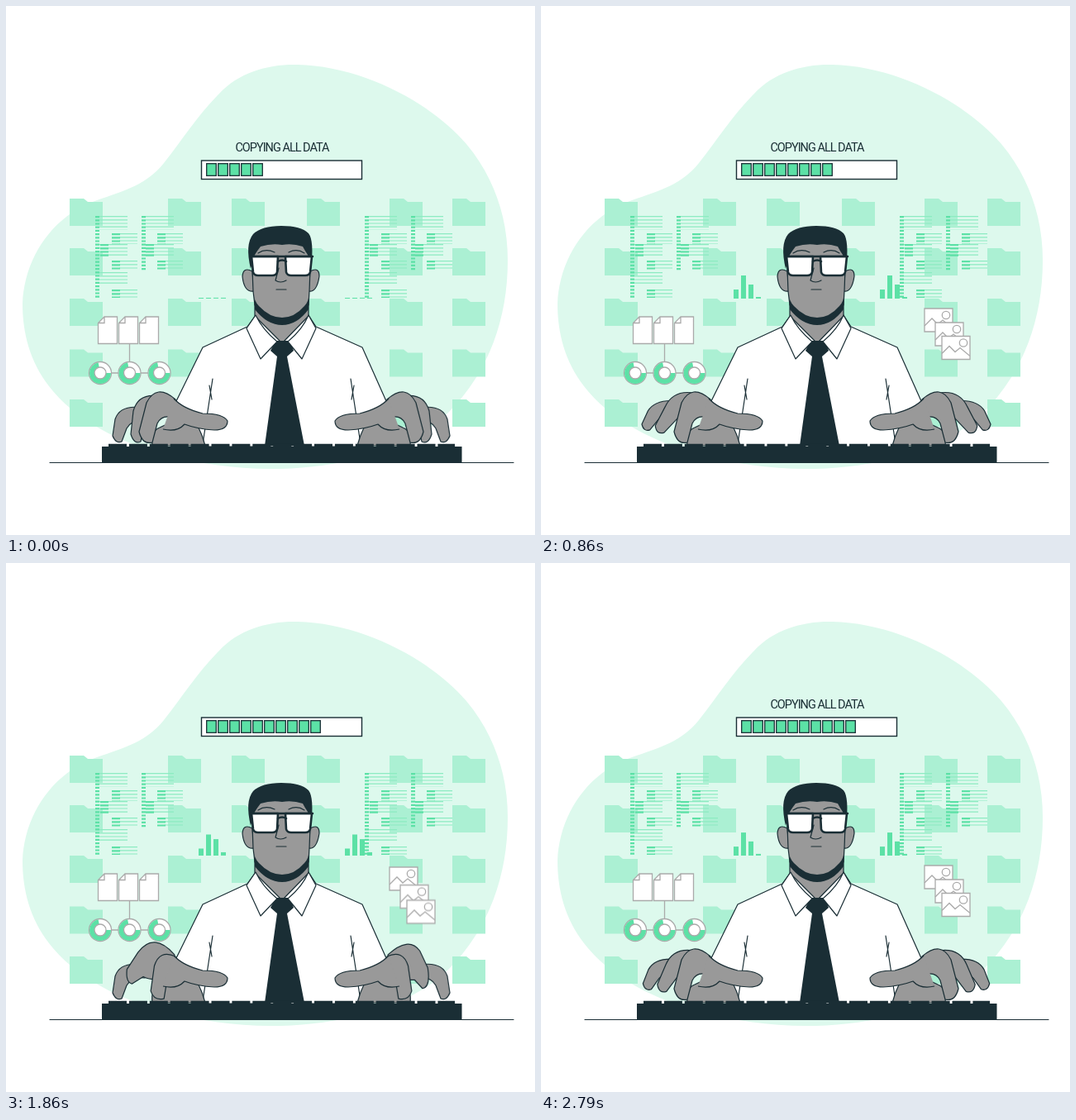
Write an HTML page without scripts that moves like this. It is 640 px wide and 640 px high and loops after 2870 ms.

```html
<!DOCTYPE html>
<html lang="en">
<head>
<meta charset="utf-8">
<title>Copying all data</title>
<style>
html, body { margin: 0; width: 100%; height: 100%; overflow: hidden; background: #fff; }
body > svg { display: block; width: 100%; height: 100%; }

:root { --dark: #1a2e35; --green: #5ce1a6; --skin: #999; --loop: 2.87s infinite; }
.dark { fill: var(--dark); }
.green { fill: var(--green); }
.line { fill: none; stroke: var(--dark); stroke-width: 1.2; stroke-linecap: round; stroke-linejoin: round; }
.skin { fill: var(--skin); stroke: var(--dark); stroke-width: 1.2; stroke-linejoin: round; }
.cloth { fill: #fff; stroke: var(--dark); stroke-width: 1.2; stroke-linejoin: round; }
.icon { fill: #fff; stroke: #aaa; stroke-width: 1.3; }
.rows { fill: none; stroke: #8cebc1; stroke-dasharray: 1.2 3; }
.marks { fill: none; stroke: var(--green); stroke-dasharray: 2.2 2; }

.title {
  font: 14.5px Roboto, "Liberation Sans", sans-serif; letter-spacing: -1px;
  fill: var(--dark); text-anchor: middle; animation: blink var(--loop) step-end;
}
@keyframes blink {
  0%, 22.4%, 44.8%, 67.2%, 89.6%, 100% { opacity: 1; }
  11.2%, 33.6%, 56%, 78.4% { opacity: 0; }
}

.progress { animation: fill-up var(--loop) step-end; }
@keyframes fill-up {
  0% { width: 70px; }
  8.7% { width: 84px; }
  18.1% { width: 98px; }
  27.5% { width: 112px; }
  36.9% { width: 126px; }
  46.3%, 100% { width: 140px; }
}

/* Each bar sets its four heights; the cycle repeats about six times per loop. */
.bar { animation: equalise var(--loop) linear; transform-origin: 0 354px; }
.b1 { --h1: 1.5; --h2: 8; --h3: 11; --h4: 5; }
.b2 { --h1: 3; --h2: 2.5; --h3: 28; --h4: 22; }
.b3 { --h1: 12; --h2: 2.5; --h3: 17; --h4: 24; }
.b4 { --h1: 9; --h2: 4.5; --h3: 2; --h4: 7; }
@keyframes equalise {
  0% { transform: scaleY(1); }
  3%, 19.9%, 36.7%, 53.5%, 70.3%, 87.1% { transform: scaleY(var(--h1)); }
  6.1%, 22.9%, 39.7%, 56.5%, 73.3%, 90.1% { transform: scaleY(var(--h2)); }
  13.2%, 30%, 46.8%, 63.6%, 80.4%, 97.2% { transform: scaleY(var(--h3)); }
  16.2%, 33%, 49.8%, 66.6%, 83.4%, 100% { transform: scaleY(var(--h4)); }
}

.pictures { animation: appear var(--loop) linear; }
@keyframes appear { 0%, 2% { opacity: 0; } 7%, 100% { opacity: 1; } }
.picture { animation: bob var(--loop) linear; }
@keyframes bob {
  0%, 7.6%, 22.4%, 30%, 44.8%, 52.4%, 67.2%, 74.8%, 89.6%, 100% { transform: none; }
  15%, 17.3%, 37.4%, 39.7%, 59.8%, 62.1%, 82.2%, 84.5% { transform: translateY(12px); }
  19.9%, 42.3%, 64.7%, 87.1% { transform: translateY(var(--rise)); }
}

.glare { fill: #bbb; animation: sweep var(--loop) linear; }
@keyframes sweep {
  0%, 37.5%, 42%, 59.9%, 64.4%, 82.3%, 86.8%, 100% { transform: translateX(-34px); }
  41.9%, 64.3%, 86.7% { transform: translateX(34px); }
}

.finger { animation: type var(--loop) linear; d: var(--rest); }
.pinky {
  --rest: path("M165 486Q138 482 132 500L129 520Q133 530 140 527L146 511Q152 500 168 502Z");
  --tap: path("M170 474Q140 470 128 484L118 498Q119 507 127 505L140 494Q150 487 170 492Z");
  --reach: var(--tap);
  --lift: var(--rest);
}
.middle {
  --rest: path("M185 472Q160 468 154 490L151 518Q155 531 163 527L167 508Q170 495 185 500Z");
  --reach: path("M185 466Q160 462 148 482L131 502Q131 512 141 510L160 498Q170 492 185 498Z");
  --tap: var(--reach);
  --lift: path("M205 474Q180 444 160 470L146 490Q144 506 152 508L166 500Q180 508 205 500Z");
}
.index {
  --rest: path("M205 476Q182 456 170 480L161 515Q165 531 177 528L183 505Q190 492 206 500Z");
  --tap: var(--rest);
  --reach: path("M205 474Q186 448 172 472L152 500Q152 516 163 514L180 498Q190 490 206 500Z");
  --lift: path("M205 476Q186 468 180 488L176 518Q180 530 192 527L195 508Q198 498 206 500Z");
}
.right .pinky {
  --reach: path("M168 480Q140 478 128 492L123 512Q127 526 135 523L143 506Q150 496 168 500Z");
}
.right .middle {
  --lift: path("M205 474Q180 450 166 468L156 488Q152 512 162 514L172 504Q184 506 205 500Z");
}
@keyframes type {
  0%, 12.2%, 22.4%, 34.6%, 44.8%, 57%, 67.2%, 79.4%, 89.6%, 100% { d: var(--rest); }
  27.4%, 49.8%, 72.2%, 94.6% { d: var(--tap); }
  39.7%, 62.1%, 84.5% { d: var(--reach); }
  19.9%, 42.3%, 64.7%, 87.1% { d: var(--lift); }
}
</style>
</head>
<body>
<svg viewBox="0 0 640 640">
  <defs>
    <path id="folder" d="M0 0h17l5 4h18v29H0z" fill="#abf0d3"/>
    <g id="shelf">
      <use href="#folder" x="77"/><use href="#folder" x="196"/><use href="#folder" x="273"/>
      <use href="#folder" x="364"/><use href="#folder" x="464"/><use href="#folder" x="540"/>
    </g>
    <g id="listing">
      <path class="rows" stroke-width="34" d="M130 254v17M130 288v16M130 322v15M186 254v17M186 288v16"/>
      <path class="rows" stroke-width="22" d="M148 275v13M148 308v12M148 343v10M203 275v13M203 308v12"/>
      <path class="marks" stroke-width="5" d="M110.500 254v99M166.500 254v66"/>
      <path class="marks" stroke-width="10" d="M133 275v13M133 308v12M133 343v10M188 275v13M188 308v12M119 288v16M174 288v16"/>
    </g>
    <path id="sheet" class="icon" d="M119 376H134.500V408.500H111.500V383.500ZM119 376V383.500H111.500"/>
    <g id="ring">
      <circle class="icon" r="13.500"/>
      <circle r="10" fill="none" stroke="#5ce1a6" stroke-width="6" pathLength="100" stroke-dasharray="72 28"/>
      <circle class="icon" r="7"/>
    </g>
    <g id="photo">
      <path class="icon" d="M0 0H34V28H0Z"/>
      <path class="icon" d="M0 21L9 12L16 19L22 14L34 24"/>
      <circle class="icon" cx="26" cy="8" r="4.700"/>
    </g>
    <path id="heel" class="skin" d="M177 532Q175 514 186 510L207 500L232 508Q238 520 241 532Z"/>
    <path id="thumb" class="skin" d="M203 475Q214 487 238 493Q263 493 268 502Q268 513 252 513Q232 512 216 506Q207 516 190 512"/>
    <pattern id="blocks" x="242" y="190" width="14" height="16" patternUnits="userSpaceOnUse">
      <rect class="green" x=".700" y=".700" width="11.600" height="14.600" stroke="#1a2e35" stroke-width="1.300"/>
    </pattern>
  </defs>

  <path fill="#ddf9ed" d="M353 71C430 73 512 115 557 167C592 209 607 258 607 308C607 378 584 443 536 491C486 540 400 560 320 560C220 559 105 529 52 460C29 430 20 396 20 360C22 306 55 254 110 235C145 223 170 216 191 190C213 162 233 131 258 106C282 80 318 70 353 71Z"/>
  <use href="#shelf" y="233"/><use href="#shelf" y="293"/><use href="#shelf" y="354"/>
  <use href="#shelf" y="415.500"/><use href="#shelf" y="476"/>
  <use href="#listing"/><use href="#listing" x="326"/>
  <g class="green">
    <path class="bar b1" d="M233 353h6v1h-6zM410 353h6v1h-6z"/>
    <path class="bar b2" d="M242 353h6v1h-6zM419 353h6v1h-6z"/>
    <path class="bar b3" d="M251 353h6v1h-6zM428 353h6v1h-6z"/>
    <path class="bar b4" d="M260 353h6v1h-6zM437 353h6v1h-6z"/>
  </g>

  <text class="title" x="334" y="175.500">COPYING ALL DATA</text>
  <rect x="236.500" y="187" width="194" height="22.500" fill="#fff" stroke="#1a2e35" stroke-width="1.400"/>
  <rect class="progress" x="242" y="190" width="70" height="16" fill="url(#blocks)"/>

  <path class="icon" d="M149.500 408V430M128 444H172"/>
  <use href="#sheet"/><use href="#sheet" x="25"/><use href="#sheet" x="50"/>
  <use href="#ring" x="114" y="444"/><use href="#ring" x="149.500" y="444"/><use href="#ring" x="185.500" y="444"/>

  <g class="pictures">
    <g class="picture" style="--rise: 2px"><use href="#photo" x="464" y="366"/></g>
    <g class="picture" style="--rise: 7px"><use href="#photo" x="477" y="383"/></g>
    <g class="picture" style="--rise: 9px"><use href="#photo" x="485" y="399.500"/></g>
  </g>

  <path class="cloth" d="M302 374L292 388L238 413L206 478L238 533H428L460 478L431 413L375 388L366 374Z"/>
  <path class="line" d="M250 451L238 530M246 459L249 476M417 451L429 530M421 459L418 476"/>

  <path class="skin" d="M301 335V375L334 408L366 375V335Z"/>
  <path class="dark" d="M301 350V367Q316 386 334 386Q352 386 366 367V350Z"/>
  <path class="skin" d="M298 321Q287 315 286 327Q288 347 300 345ZM368 321Q379 315 379 327Q376 347 366 345Z"/>
  <path fill="#999" d="M298 295L299 345Q300 357 306 363Q319 377 334 377Q349 377 361 363Q367 357 367 345L369 295Q334 274 298 295Z"/>
  <path class="line" d="M298 318L299 345L301 362M368 318L367 345L366 362"/>
  <path class="dark" d="M296 318Q289 288 299 276Q309 266 333 266Q357 266 366 275Q373 284 369 318L365 301Q361 295 359 291Q347 287 334 289Q321 287 308 291Q304 296 301 301Z"/>
  <path class="line" d="M305 299Q314 293 325 298M342 298Q352 293 361 299"/>
  <path class="line" d="M330 317L326 332Q332 336 339 332M327 343H339"/>
  <path fill="#fff" stroke="#1a2e35" stroke-width="2.600" stroke-linejoin="round" d="M297 303H329L328 322Q327 326 322 326H305Q300 326 299 322ZM338 303H370L368 322Q367 326 362 326H345Q340 326 339 322Z"/>
  <svg x="300" y="304" width="28" height="21"><path class="glare" d="M14 0H25L20 21H9ZM27 0H30L25 21H22Z"/></svg>
  <svg x="340" y="304" width="28" height="21"><path class="glare" d="M8 0H19L14 21H3ZM21 0H24L19 21H16Z"/></svg>
  <path class="line" style="stroke-width: 2.600" d="M296 303H371M329 309Q334 306 339 309"/>

  <path class="dark" d="M326 405H344L348 417L340 424L361 532H313L328 424L320 417Z"/>
  <path class="cloth" d="M302 374L291 390L308 427L328 406Q310 391 302 374ZM366 374L375 390L358 427L341 406Q359 391 366 374Z"/>

  <g>
    <use href="#heel"/>
    <path class="skin finger pinky"/>
    <path class="skin finger middle"/>
    <path class="skin finger index"/>
    <use href="#thumb"/>
  </g>
  <g class="right" transform="matrix(-1 0 0 1 666 0)">
    <use href="#heel"/>
    <path class="skin finger pinky"/>
    <path class="skin finger middle"/>
    <path class="skin finger index"/>
    <use href="#thumb"/>
  </g>

  <path class="line" d="M53 552.500H614"/>
  <rect class="dark" x="116" y="533" width="435.500" height="20"/>
  <path fill="none" stroke="#1a2e35" stroke-width="4.500" stroke-dasharray="22 2.900" d="M124 532H543"/>
</svg>
</body>
</html>
```
